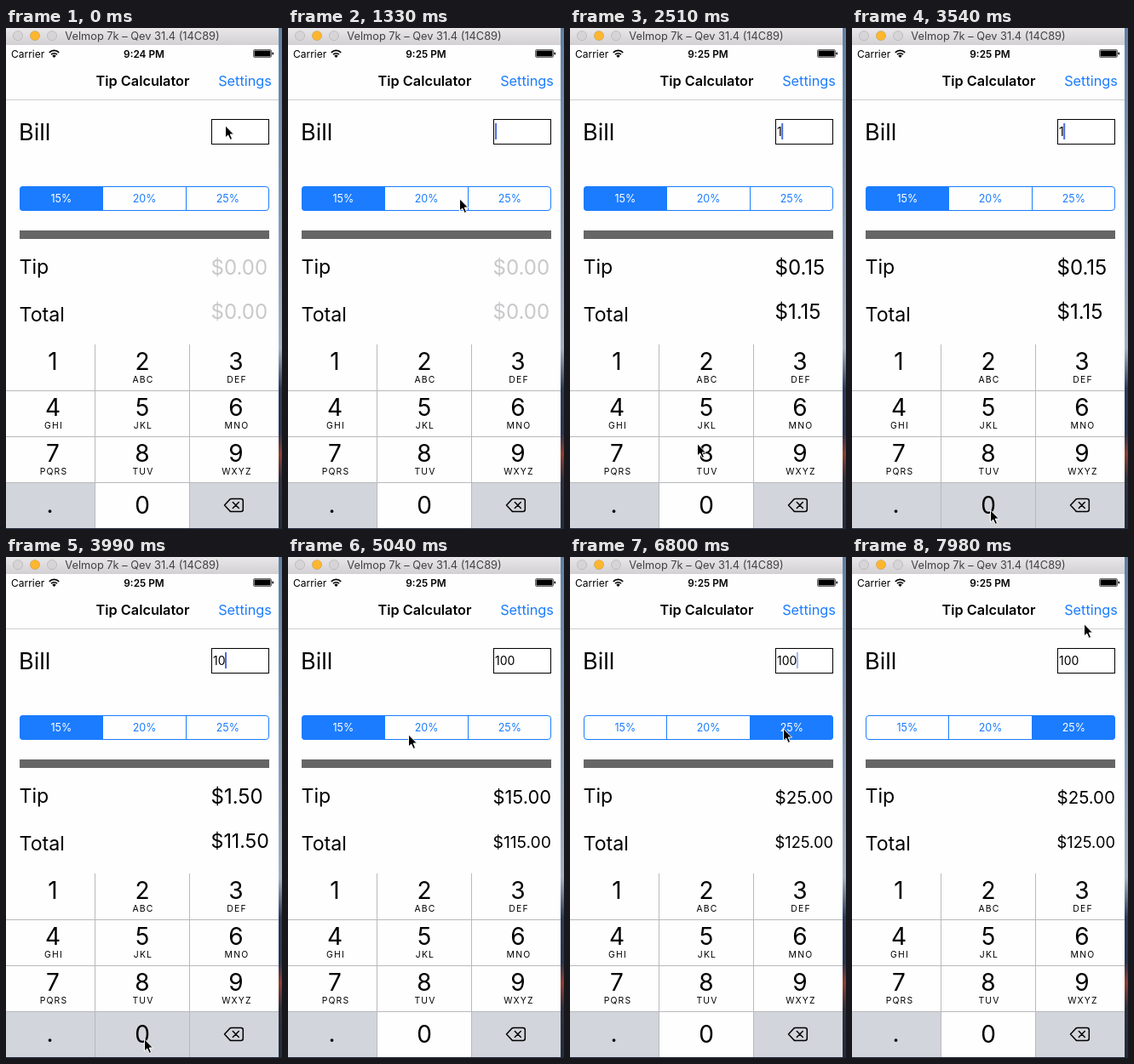
An HTML page that plays this animation: 324 px wide and 589 px high, repeating every 8 s.

```html
<!DOCTYPE html>
<html lang="en">
<head>
<meta charset="utf-8">
<title>Tip Calculator</title>
<style>
  html, body { margin: 0; width: 100%; height: 100%; overflow: hidden; background: #fff; }
  svg { display: block; width: 324px; height: 589px; }
  text { font-family: Inter, "Liberation Sans", Arial, sans-serif; fill: #000; }
  .mid { text-anchor: middle; }
  .bold { font-weight: 600; }
  .blue { fill: #1b7cff; }
</style>
</head>
<body>
<svg id="stage" viewBox="0 0 324 589">
  <defs>
    <linearGradient id="bar" x2="0" y2="1">
      <stop stop-color="#e9e7e9"/><stop offset="1" stop-color="#d2d0d2"/>
    </linearGradient>
    <linearGradient id="desk" x2="0" y2="1">
      <stop stop-color="#5f7fa6"/><stop offset=".64" stop-color="#a3b0c3"/>
      <stop offset=".72" stop-color="#2a3c58"/><stop offset=".81" stop-color="#2a3550"/>
      <stop offset=".85" stop-color="#8f3f33"/><stop offset=".9" stop-color="#2e3040"/>
      <stop offset="1" stop-color="#222c3d"/>
    </linearGradient>
    <clipPath id="pill"><rect x="16" y="186" width="293" height="29" rx="4"/></clipPath>
  </defs>
</svg>
<script>
const LOOP = 8000, STEP = 147.8, BLUE = '#1b7cff', GREY = '#d2d5db', LINE = '#b8b9bc';
const stage = document.getElementById('stage');

function add(tag, attrs, content) {
  const el = document.createElementNS('http://www.w3.org/2000/svg', tag);
  for (const key in attrs) el.setAttribute(key, attrs[key]);
  if (content !== undefined) el.textContent = content;
  return stage.appendChild(el);
}
const rect = (x, y, width, height, fill, more) => add('rect', { x, y, width, height, fill, ...more });
const label = (x, y, size, content, cls = '', more) =>
  add('text', { x, y, 'font-size': size, class: cls, ...more }, content);
const path = (d, more) => add('path', { d, fill: 'none', stroke: '#000', ...more });

// Window and desktop edge
rect(0, 0, 324, 589, 'url(#desk)');
rect(0, 0, 320, 588, '#fefefe');
rect(0, 0, 320, 20, 'url(#bar)');
['#d6d4d6', '#fdb62e', '#d6d4d6'].forEach((fill, i) =>
  add('circle', { cx: 14 + 20 * i, cy: 9, r: 5.6, fill, stroke: '#000', 'stroke-opacity': .12 }));
label(160, 14, 12.8, 'Velmop 7k – Qev 31.4 (14C89)', 'mid', { style: 'fill:#424242' });

// Status bar
label(6, 34.5, 12, 'Carrier');
path('M50.8 28.8a8 8 0 0 1 11.4 0M53 31.2a5 5 0 0 1 7 0', { 'stroke-width': 1.7 });
path('M56.5 35l-2.2-2.3a3.1 3.1 0 0 1 4.4 0Z', { fill: '#000', stroke: 'none' });
const clock = label(162, 34.5, 11.8, '', 'mid bold');
rect(290.5, 25.5, 21, 9, 'none', { rx: 1.5, stroke: '#666' });
rect(291.5, 26.5, 19, 7, '#000');
rect(312.5, 28.5, 1.5, 3, '#000', { rx: .7 });

// Navigation bar
rect(0, 84, 320, 1, '#cfcfcf');
label(160.5, 68, 16.3, 'Tip Calculator', 'mid bold');
label(280.5, 68, 16.3, 'Settings', 'mid blue');

// Bill field
label(15, 131.5, 27, 'Bill');
rect(241.5, 107.5, 67, 29, '#fff', { stroke: '#000' });
const bill = label(243, 127, 14, '');
const caret = rect(243, 112, 2, 19, '#4a6ee0');

// Segmented control
const chosen = rect(16, 186, 98, 29, BLUE, { 'clip-path': 'url(#pill)' });
rect(16.5, 186.5, 292, 28, 'none', { stroke: BLUE, rx: 3.5 });
[113, 211].forEach(x => rect(x, 186, 1, 29, BLUE));
const segments = ['15%', '20%', '25%'].map((s, i) => label(64.8 + 97.8 * i, 205, 12.5, s, 'mid'));

// Results
rect(16, 238, 293, 10, '#666');
label(15.5, 289, 23.2, 'Tip');
label(15.5, 345, 23.2, 'Total');
const tip = label(240.5, 290.2, 24, '');
const total = label(240.5, 342.2, 24, '');

// Keypad
const cols = [0, 105, 216, 320], centers = [55, 160, 270];
const keyBox = (c, r) => rect(cols[c], 372 + 54 * r, cols[c + 1] - cols[c], 54, GREY);
keyBox(0, 3);
keyBox(2, 3);
const keys = { 1: keyBox(0, 0), 0: keyBox(1, 3) };
for (let i = 1; i < 4; i++) rect(0, 372 + 54 * i, 320, 1, LINE);
[104, 215].forEach(x => rect(x, 372, 1, 216, LINE));
['', 'ABC', 'DEF', 'GHI', 'JKL', 'MNO', 'PQRS', 'TUV', 'WXYZ'].forEach((letters, i) => {
  const x = centers[i % 3], y = 402 + 54 * Math.floor(i / 3);
  label(x, y, 28, i + 1, 'mid');
  label(x + 1, y + 15, 10.4, letters, 'mid', { 'letter-spacing': 1.2 });
});
label(51.5, 570, 28, '.', 'mid');
label(160, 571, 28, '0', 'mid');
path('M256.5 561l6-6.6q1-1 2.3-1h11q2.5 0 2.5 2.5v10.2q0 2.5-2.5 2.5h-11q-1.3 0-2.3-1Z' +
  'M266.3 557.5l7 7m0-7l-7 7', { 'stroke-width': 1.5, 'stroke-linejoin': 'round', 'stroke-linecap': 'round' });

const arrow = path('M.5 .8V15l3.2-3 2.5 5.4 2.4-1-2.4-5.4h4.3Z', { fill: '#000', stroke: '#fff' });

const ENTRY = '100', edits = [15, 25, 28], taps = [39, 45], minute = 8;
const stops = [
  [0, 257, 114], [8, 257, 114], [9, 201, 200], [12, 57, 383], [15, 57, 383], [17, 149, 488],
  [20, 162, 566], [29, 162, 566], [34, 141, 208], [37, 178, 208], [40, 178, 208],
  [43, 250, 201], [46, 250, 201], [52, 287, 30], [54, 272, 78]
];

const passed = (list, n) => list.filter(start => start <= n).length;
const clamp = v => Math.min(1, Math.max(0, v));

function pointer(n) {
  const i = Math.max(1, stops.findIndex(stop => stop[0] >= n));
  const [n0, x0, y0] = stops[i - 1], [n1, x1, y1] = stops[i];
  const p = (1 - Math.cos(Math.PI * (n - n0) / (n1 - n0))) / 2;
  return [x0 + (x1 - x0) * p, y0 + (y1 - y0) * p].map(Math.round);
}

// Fades in and out every seven steps, starting anew with each edit
function blink(n, count) {
  const phase = (n - (count ? edits[count - 1] : 1) + 1) % 7;
  return clamp(1.5 - Math.abs(phase - 3) / 2);
}

// Shrinks long amounts to the width of the label
function money(el, value, empty) {
  const content = '$' + value.toFixed(2);
  el.style.fill = empty ? '#c9c9cc' : '#000';
  if (el.textContent === content) return;
  el.textContent = content;
  el.setAttribute('font-size', 24);
  el.setAttribute('font-size', 24 * clamp(68.5 / el.getComputedTextLength()));
}

function draw(now) {
  const n = Math.floor((now % LOOP + 12) / STEP);
  const count = passed(edits, n), choice = passed(taps, n);
  const typed = ENTRY.slice(0, count), amount = Number(typed), rate = .15 + .05 * choice;
  const pressed = edits.includes(n + 1) ? ENTRY[count] : '';

  clock.textContent = n < minute ? '9:24 PM' : '9:25 PM';
  bill.textContent = typed;
  caret.setAttribute('x', 243 + (typed ? bill.getComputedTextLength() - .5 : 0));
  caret.setAttribute('opacity', blink(n, count));
  money(tip, amount * rate, !typed);
  money(total, amount * (1 + rate), !typed);
  chosen.setAttribute('x', 16 + 97.5 * choice);
  segments.forEach((s, i) => { s.style.fill = i === choice ? '#fff' : BLUE; });
  for (const key in keys) keys[key].setAttribute('opacity', key === pressed ? 1 : 0);
  arrow.setAttribute('transform', `translate(${pointer(Math.min(n, 54))})`);
}

function loop() {
  draw(performance.now());
  requestAnimationFrame(loop);
}
loop();
</script>
</body>
</html>
```
